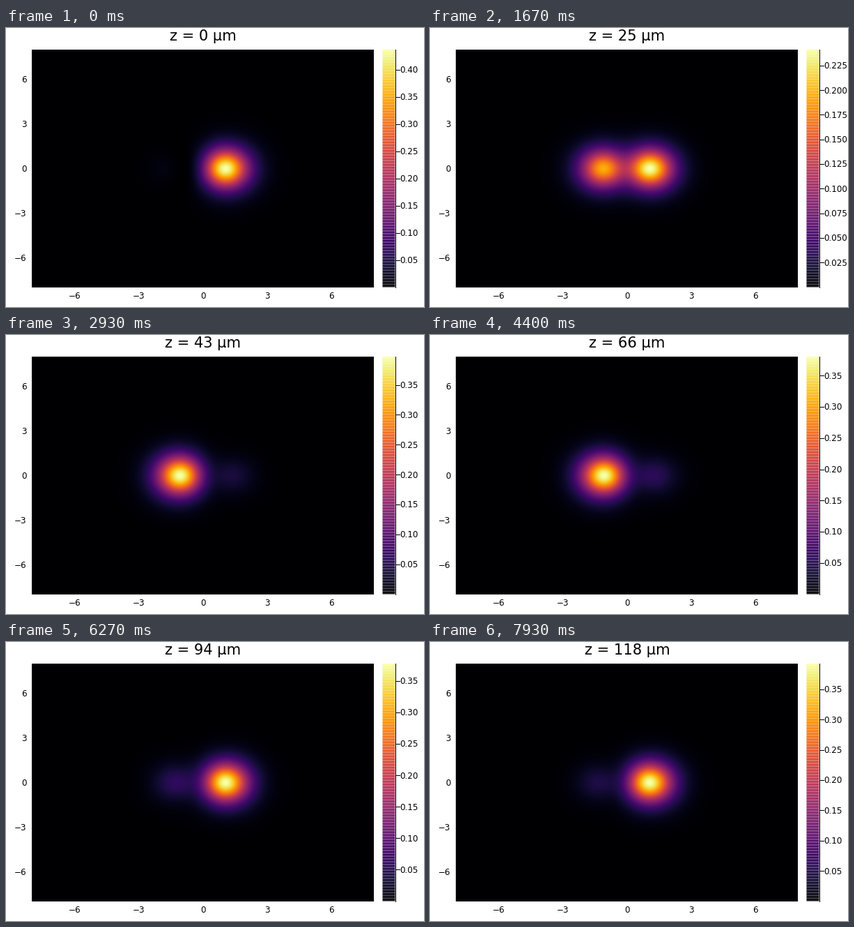
A matplotlib script that plays this animation: 600x400 px, repeating every 8000 ms.

```python
import math

import numpy as np
import matplotlib.pyplot as plt
from matplotlib.animation import FuncAnimation
from matplotlib.collections import PolyCollection

W, H, DPI = 600, 400, 100
FRAMES, LOOP_MS = 120, 8000
LEFT, RIGHT, TOP, BOTTOM = 37, 528, 31, 372
BAR_L, BAR_R, BAR_T, BAR_B = 540.5, 558.5, 31, 371.5
BEAT = 0.05878        # phase difference of the two modes per µm
PEAK = 0.4372         # highest intensity at z = 0
MINUS = "\u2212"

plt.rcParams["font.family"] = "DejaVu Sans"
fig = plt.figure(figsize=(W / DPI, H / DPI), dpi=DPI, facecolor="white")
ax = fig.add_axes([0, 0, 1, 1])


def label(x, y, s, px, ha):
    return ax.text(x, y, s, fontsize=px * 72 / DPI, ha=ha, va="baseline",
                   color="black")


def bump(x, y, x0, decay=1.3, core=1.3, stretch=1.23):
    """Rounded peak with exponential tails."""
    q = np.sqrt(core**2 + (x - x0)**2 + (y / stretch)**2)
    return np.exp(-decay * (q - core))


# Intensity with all light in the right or in the left guide
cols, rows = RIGHT - LEFT, BOTTOM - TOP
xs = (np.arange(cols) + 0.5) / cols * 16 - 8
ys = (np.arange(rows) + 0.5) / rows * 16 - 8
X, Y = np.meshgrid(xs, ys)
right = (bump(X, Y, 1.02) - 0.28 * bump(X, Y, -1.4))**2
right *= PEAK / right.max()
left = right[:, ::-1]

image = ax.imshow(right, cmap="inferno", vmin=0, vmax=PEAK,
                  extent=(LEFT, RIGHT, BOTTOM, TOP),
                  interpolation="nearest", aspect="auto")

# Axis labels
for v in (-6, -3, 0, 3, 6):
    text = str(v).replace("-", MINUS)
    label(282.5 + v * cols / 16, 388, text, 12, "center")
    label(29.8, 201.5 - v * 21.27 + 4.4, text, 12, "right")

# Colour bar of 256 thin bands
edges = np.linspace(BAR_B, BAR_T, 257)
bands = [[(BAR_L, a), (BAR_R, a), (BAR_R, b), (BAR_L, b)]
         for a, b in zip(edges[:-1], edges[1:])]
bar = PolyCollection(bands, facecolors=plt.get_cmap("inferno")(np.arange(256)),
                     edgecolors="none", linewidths=0)
bar.set_snap(False)
ax.add_collection(bar)
ax.plot([BAR_R, BAR_R], [BAR_T, BAR_B], color="black", lw=0.72)

marks = [ax.plot([], [], color="black", lw=0.72)[0] for _ in range(10)]
values = [label(565.4, 0, "", 12, "left") for _ in marks]
title = label(283, 18.5, "", 21, "center")

ax.set_xlim(0, W)
ax.set_ylim(H, 0)
ax.axis("off")


def draw(z):
    share = math.cos(BEAT * z / 2)**2
    field = share * right + (1 - share) * left
    top = field.max()
    image.set_data(field)
    image.set_clim(0, top)
    title.set_text(f"z = {z} \u03bcm")

    step, digits = (0.05, 2) if top > 0.25 else (0.025, 3)
    for i, (mark, value) in enumerate(zip(marks, values), start=1):
        v = i * step
        shown = v <= top
        mark.set_visible(shown)
        value.set_visible(shown)
        if shown:
            y = BAR_B - v / top * (BAR_B - BAR_T)
            mark.set_data([BAR_R, BAR_R + 6], [y, y])
            value.set_y(y + 4.4)
            value.set_text(f"{v:.{digits}f}")
    return [image, title, *marks, *values]


anim = FuncAnimation(fig, draw, frames=FRAMES, interval=LOOP_MS / FRAMES,
                     init_func=lambda: draw(0), repeat=True, repeat_delay=0)
plt.show()
```
